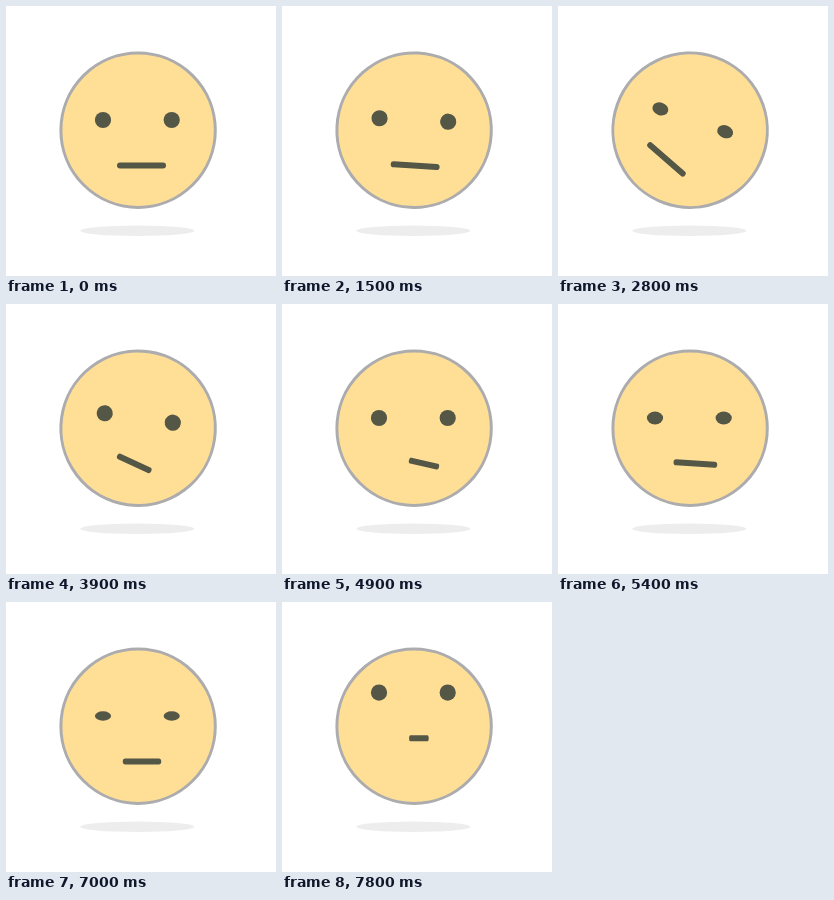
These frames come from a looping animation (270 px wide and 270 px high, 8000 ms). An HTML page:

```html
<!DOCTYPE html>
<html lang="en">
<head>
<meta charset="utf-8">
<title>Thinking face</title>
<style>
  html, body { margin: 0; width: 100%; height: 100%; overflow: hidden; background: #fff; }
  svg { display: block; width: 100vw; height: 100vh; }
</style>
</head>
<body>
<svg viewBox="0 0 270 270">
  <ellipse cx="131.3" cy="224.8" rx="57" ry="5.2" fill="#ededed"/>
  <g id="head">
    <circle cx="132.1" cy="124.2" r="77.2" fill="#ffdf96" stroke="#acacae" stroke-width="3"/>
    <g id="features" fill="#545646">
      <ellipse class="eye" cx="97" cy="114" rx="8.1"/>
      <ellipse class="eye" cx="165.7" cy="114" rx="8.1"/>
      <rect id="mouth" x="-24.5" y="-3" width="49" height="6" rx="3"/>
    </g>
  </g>
</svg>
<script>
const LOOP = 8000, STEP = 100, EYE = 8.1;
const head = document.getElementById('head');
const features = document.getElementById('features');
const mouth = document.getElementById('mouth');
const eyes = document.querySelectorAll('.eye');

const inOut = p => (1 - Math.cos(Math.PI * p)) / 2;
const out = p => Math.sin(Math.PI * p / 2);
const dip = p => Math.sin(Math.PI * p) ** 2;
const phase = (t, start, end) => Math.min(1, Math.max(0, (t - start) / (end - start)));

// Head tilt; mouth offset, turn and horizontal scale; upward look
const rest = { tilt: 0, shift: 0, turn: 0, scale: 1, lift: 0 };
const moves = [
  { start: 1120, end: 2620, to: { tilt: 19.4 } },
  { start: 1350, end: 2620, to: { shift: -16, turn: 21.6 } },
  { start: 3330, end: 4350, to: { tilt: 0, shift: 7, turn: 14, scale: 0.6 } },
  { start: 4850, end: 5900, to: { shift: 0, turn: 0, scale: 1 }, ease: out },
  { start: 6550, end: 7650, to: { shift: 1.4, scale: 0.4 } },
  { start: 7000, end: 7800, to: { lift: 23.4 } },
];

function poseAt(t) {
  const pose = { ...rest };
  for (const { start, end, to, ease = inOut } of moves) {
    const p = ease(phase(t, start, end));
    for (const key in to) pose[key] += (to[key] - pose[key]) * p;
  }
  return pose;
}

// Two quick blinks, then two slow squints
function lidAt(t) {
  const blink = t < 4000 ? 6 * dip(phase(t % 2000, 757, 997)) : 0;
  return blink + 1.7 * dip(phase(t, 4850, 5900)) + 4.2 * dip(phase(t, 6550, 7800));
}

function draw(t) {
  const { tilt, shift, turn, scale, lift } = poseAt(t);
  head.setAttribute('transform', `rotate(${tilt} 132.1 124.2)`);
  features.setAttribute('transform', `translate(0 ${-lift})`);
  mouth.setAttribute('transform', `translate(${135.5 + shift} 159.6) rotate(${turn}) scale(${scale} 1)`);
  for (const eye of eyes) eye.setAttribute('ry', EYE - lidAt(t));
}

const begin = performance.now();
function tick() {
  const t = (performance.now() - begin) % LOOP;
  draw(Math.floor(t / STEP) * STEP);
  requestAnimationFrame(tick);
}
tick();
</script>
</body>
</html>
```
